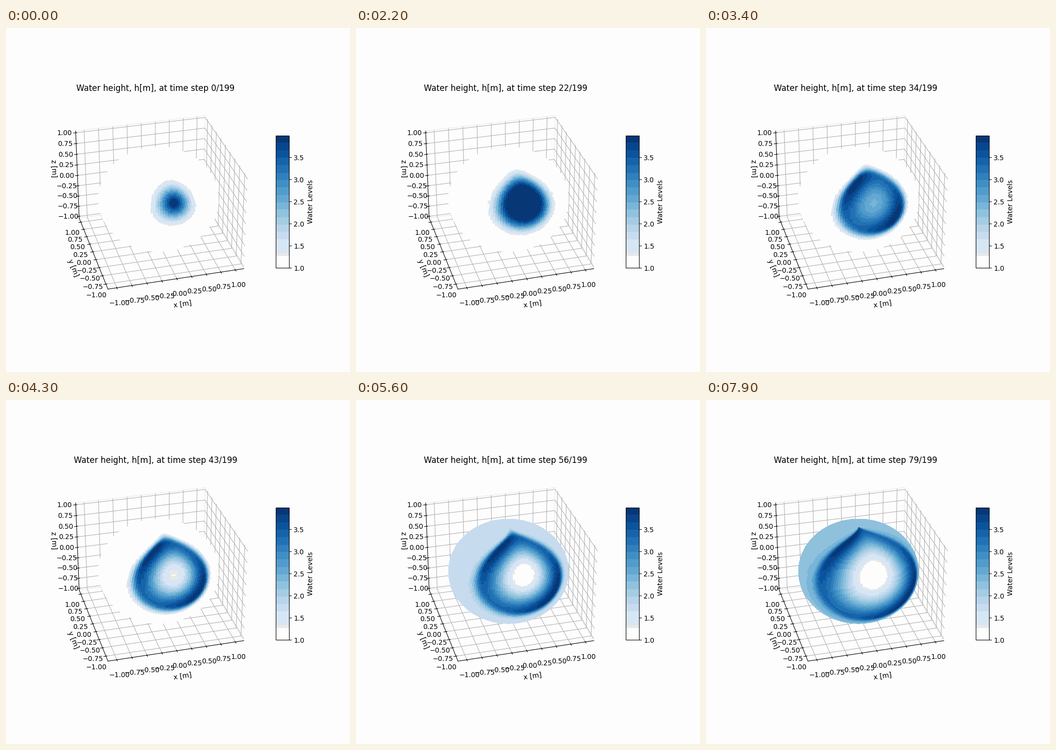
Animation, 700 px wide and 700 px high, one loop 8 s. Source, as a matplotlib script:

```python
import numpy as np
import matplotlib.pyplot as plt
from matplotlib.animation import FuncAnimation
from matplotlib.cm import ScalarMappable
from matplotlib.colors import ListedColormap, Normalize

SIZE, FRAMES, INTERVAL = 700, 80, 100
PAPER, FAINT = "#fdfdfd", "#e8e8e8"
ELEV, AZIM = 30, -105
LIM_XY, LIM_Z = 1.1 * 25 / 24, 25 / 24
CELLS = 150


def banded_blues():
    """Blues in even bands, with a white and a thin grey band at the bottom."""
    edges = np.r_[0, .09, .112, np.linspace(.216, 1, 15)]
    colors = plt.get_cmap("Blues")((edges[:-1] + edges[1:]) / 2)
    colors[0, :3] = 253 / 255
    colors[1, :3] = 232 / 255
    levels = (np.arange(256) + .5) / 256
    return ListedColormap(colors[np.searchsorted(edges, levels) - 1])


def trace_globe(cols, rows):
    """Longitude and colatitude seen at each pixel, and where the globe is."""
    scale = 434 / .185
    cx, cy = 87.5 + .095 * scale, 570.5 - .095 * scale
    x, y = np.meshgrid((cols + .5 - cx) / scale, (cy - rows - .5) / scale)

    el, az = np.radians([ELEV, AZIM])
    right = np.array([-np.sin(az), np.cos(az), 0])
    view = np.array([np.cos(el) * np.cos(az), np.cos(el) * np.sin(az), np.sin(el)])
    up = np.cross(view, right)

    unit = 1.8294640721620434 * 25 / 24 / np.sqrt(41)
    radii = np.array([2 * unit / LIM_XY, 2 * unit / LIM_XY, 1.5 * unit / LIM_Z])
    radii *= 1 + .7 / 122   # outline of the outermost cells
    eye = 10 * view / radii
    ray = (x[..., None] * right + y[..., None] * up - view) / radii

    a, b = (ray ** 2).sum(-1), ray @ eye
    disc = b ** 2 - a * (eye @ eye - 1)
    t = (-b - np.sqrt(np.maximum(disc, 0))) / a
    p = eye + t[..., None] * ray
    lon = np.degrees(np.arctan2(p[..., 1], p[..., 0])) % 360
    colat = np.degrees(np.arccos(np.clip(p[..., 2], -1, 1)))
    return lon, colat, disc >= 0


def snap(angle, span):
    cell = span / CELLS
    return np.floor(angle / cell) * cell


def smooth(u):
    u = np.clip(u, 0, 1)
    return u * u * (3 - 2 * u)


cols, rows = np.arange(180, 442), np.arange(232, 464)
lon, colat, on_globe = trace_globe(cols, rows)
east = (snap(lon, 360) - 270 + 180) % 360 - 180
north = 60 - snap(colat, 180)
dist = np.hypot(east, north)
diagonal = -np.sin(2 * np.arctan2(north, east))


def water(step):
    """Water level from 0 to 1 at each pixel; lengths are in degrees."""
    edge = 25.1 + .55 * step
    ring = (11.6 + .57 * step) * smooth(step / 36)
    centre = np.clip((45 - step) / 22.5, 0, 1)
    calm = .0755 * np.sqrt(max(step - 45, 0))
    uneven = .11 * smooth((step - 22) / 12)

    # The north-west and south-east fronts are higher and steeper
    crest = 1 - uneven + uneven * diagonal
    width = (edge - ring) / 2.19 * (1 - 2 * uneven * diagonal)
    inner = centre + (crest - centre) * smooth((dist / max(ring, .1)) ** 1.2)
    outer = calm + (crest - calm) * np.exp(-.5 * ((dist - ring) / width) ** 2)
    return np.clip(np.where(dist < ring, inner, outer), 0, 1)


plt.rcParams["font.family"] = "DejaVu Sans"
fig = plt.figure(figsize=(SIZE / 100, SIZE / 100), dpi=100, facecolor=PAPER)
ax = fig.add_subplot(projection="3d", facecolor=PAPER)
ax.view_init(ELEV, AZIM)

ticks = np.linspace(-1, 1, 9)
ax.set(xticks=ticks, yticks=ticks, zticks=ticks,
       xlabel="x [m]", ylabel="y [m]", zlabel="z [m]")
ax.set_xlim(-LIM_XY, LIM_XY)
ax.set_ylim(-LIM_XY, LIM_XY)
ax.set_zlim(-LIM_Z, LIM_Z)
for axis, edge_color in ((ax.xaxis, PAPER), (ax.yaxis, FAINT), (ax.zaxis, FAINT)):
    axis.pane.set(alpha=1, facecolor=PAPER, edgecolor=edge_color, linewidth=.7)

cmap = banded_blues()
fig.colorbar(ScalarMappable(Normalize(1, 3.993), cmap), ax=ax,
             shrink=.5, aspect=10, label="Water Levels")
title = ax.set_title("", y=1)
title.set_y(1)   # 3D axes lower their title by default
globe = fig.figimage(np.zeros(dist.shape + (4,), np.uint8), xo=cols[0],
                     yo=SIZE - rows[-1] - 1, origin="upper", zorder=5)


def update(step):
    title.set_text(f"Water height, h[m], at time step {step}/199")
    pixels = cmap(water(step), bytes=True)
    pixels[~on_globe] = 0
    globe.set_data(pixels)
    return title, globe


anim = FuncAnimation(fig, update, frames=FRAMES, interval=INTERVAL,
                     init_func=lambda: update(0), repeat=True, repeat_delay=0)
plt.show()
```
